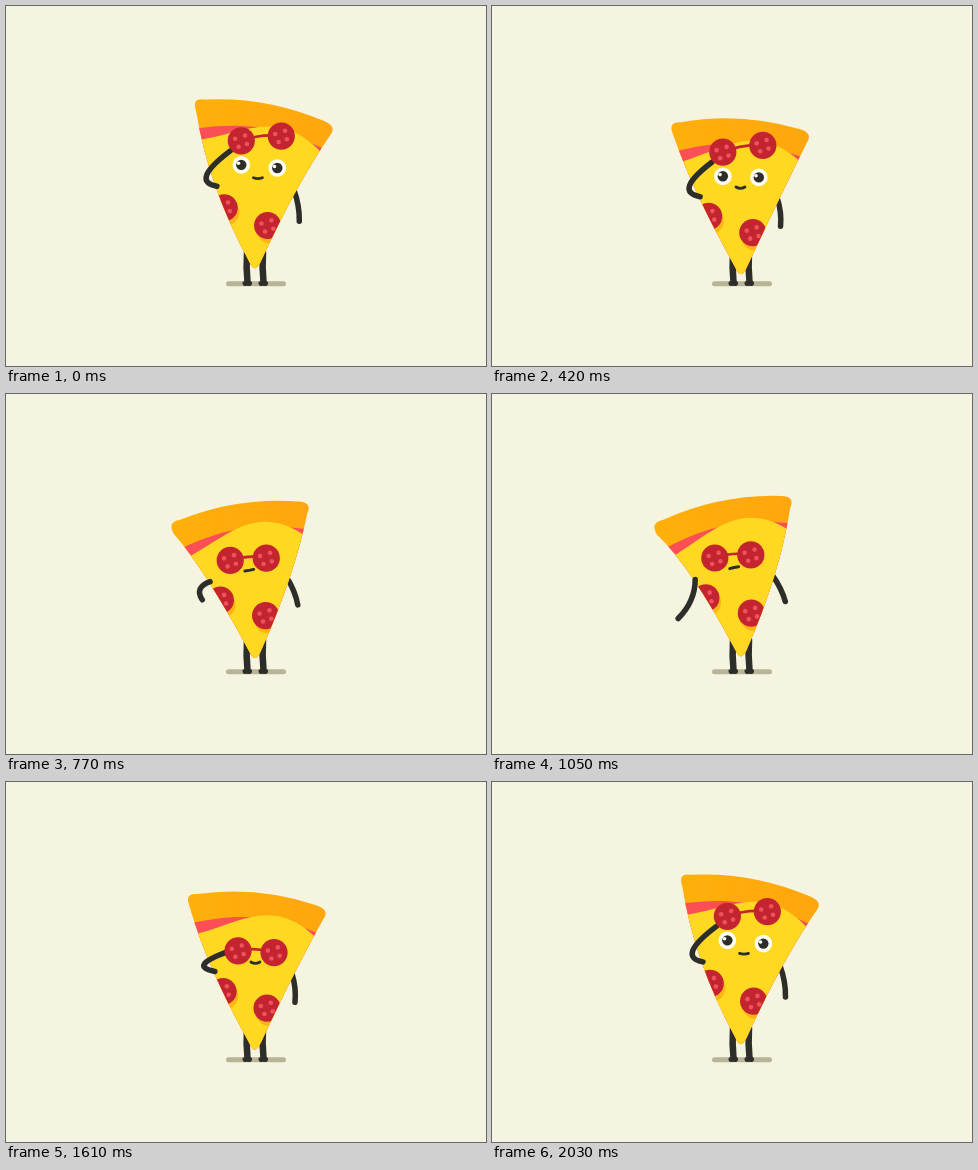
Recreate the animation shown at these times as an HTML page with a canvas. Size 480x360 px, loop 2100 ms.

```html
<!DOCTYPE html>
<html>
<head>
<meta charset="utf-8">
<title>Pizza slice with sunglasses</title>
<style>
html, body { margin: 0; width: 100%; height: 100%; overflow: hidden; background: #f5f4e0; }
canvas { display: block; }
</style>
</head>
<body>
<canvas id="stage" width="480" height="360"></canvas>
<script>
const ctx = document.getElementById('stage').getContext('2d');
const STEP = 70, COUNT = 30;
const PAPER = '#f5f4e0', INK = '#2d2e2a', CHEESE = '#ffd921', SHADE = '#fdb515', SAUCE = '#fb4f55';
const RED = '#c4242f', DOT = '#ee525b', WHITE = '#fffef6';
const TIP = [248.5, 262];

const shift = ([x, y], dx, dy) => [x + dx, y + dy];
const mix = (a, b, s) => a.map((v, k) => v + (b[k] - v) * s);
// Control point of a curve from a to b that passes through m
const through = (a, m, b) => m.map((v, k) => 2 * v - (a[k] + b[k]) / 2);

function ease(from, to, f) {
  const s = Math.min(1, Math.max(0, (f - from) / (to - from)));
  return s * s * (3 - 2 * s);
}

// One sway to the left and back per loop, with a squash at each crossing
function motion(f) {
  const angle = 2 * Math.PI * (f + 1) / COUNT;
  return { sway: Math.cos(angle), squash: Math.sin(angle) ** 2 };
}

// Moves a resting point of the slice; the bend grows with the height above the tip
function bender({ sway, squash }) {
  return (x, y) => {
    const h = TIP[1] - y, k = (h / 147) ** 2, side = (x - TIP[0]) * k;
    return [
      x + k * (13.5 * sway + 2.5 * squash),
      y + sway * (0.19 * side - 4 * k * k) + squash * (6 + 0.04 * h + 0.05 * side)
    ];
  };
}

function disc([x, y], r, color) {
  ctx.fillStyle = color;
  ctx.beginPath();
  ctx.arc(x, y, r, 0, 7);
  ctx.fill();
}

function line(a, c, b, width, color) {
  ctx.strokeStyle = color;
  ctx.lineWidth = width;
  ctx.beginPath();
  ctx.moveTo(...a);
  ctx.quadraticCurveTo(...c, ...b);
  ctx.stroke();
}

function salami(p) {
  disc(p, 13.6, RED);
  for (let i = 0; i < 4; i++) {
    const angle = 1.47 * i - 0.95;
    disc(shift(p, 6.5 * Math.cos(angle), 6.5 * Math.sin(angle)), 2.3, DOT);
  }
}

function eye(p) {
  disc(p, 8.8, WHITE);
  disc(p, 5.2, INK);
  disc(shift(p, -2.8, -1.6), 1.8, WHITE);
}

function slice(bend) {
  const a = bend(175, 113.5), b = bend(313, 111.5), t = bend(...TIP), m = mix(a, b, 0.5);
  const len = Math.hypot(t[0] - m[0], t[1] - m[1]);
  // u runs along the crust, v from the crust towards the tip
  const at = (u, v) => a.map((p, k) => p + u * (b[k] - p) + v * (t[k] - m[k]) / len);
  const tipL = shift(t, -5, -6), tipR = shift(t, 6, -6);
  const left = at(0.015, 9), right = at(0.985, 9);

  ctx.save();
  ctx.beginPath();
  ctx.moveTo(...tipL);
  ctx.quadraticCurveTo(...through(tipL, bend(205.5, 182.5), left), ...left);
  ctx.quadraticCurveTo(...at(-0.025, -4), ...at(0.07, -4));
  ctx.quadraticCurveTo(...at(0.5, -18), ...at(0.93, -4));
  ctx.quadraticCurveTo(...at(1.03, -1), ...right);
  ctx.quadraticCurveTo(...through(right, bend(286, 183.5), tipR), ...tipR);
  ctx.quadraticCurveTo(...shift(t, 0, 6), ...tipL);
  ctx.clip();

  const crust = ctx.createLinearGradient(...a, ...b);
  crust.addColorStop(0, '#ffb00a');
  crust.addColorStop(1, '#ffa60e');
  ctx.fillStyle = crust;
  ctx.fillRect(140, 70, 210, 210);

  const layer = (color, v0, c1, c2, v1) => {
    ctx.fillStyle = color;
    ctx.beginPath();
    ctx.moveTo(...at(0, v0));
    ctx.bezierCurveTo(...at(0.38, c1), ...at(0.62, c2), ...at(1, v1));
    ctx.lineTo(...at(1.1, 180));
    ctx.lineTo(...at(-0.1, 180));
    ctx.fill();
  };
  layer(SAUCE, 27, 10, 10, 26);
  layer(CHEESE, 39, 24, -16, 37);

  for (const p of [bend(216, 202.5), bend(260.5, 219)]) {
    disc(shift(p, 2, 4.5), 13.2, SHADE);
    salami(p);
  }
  ctx.restore();
}

function ground() {
  ctx.fillStyle = PAPER;
  ctx.fillRect(0, 0, 480, 360);
  line([222.5, 277.7], [250, 277.7], [277.5, 277.7], 5, '#b8b498');
  for (const x of [241, 257]) {
    line([x, 246], [x - 1, 262], [x + 0.5, 276], 6.5, INK);
    line([x - 2, 277.5], [x, 277], [x + 2.5, 277.5], 5, INK);
  }
}

function draw(f) {
  const pose = motion(f), { sway, squash } = pose, bend = bender(pose);
  ctx.lineCap = 'round';
  ground();

  const shoulderR = bend(284, 182);
  const handR = [293.5 - 5 * squash, 211 + 4 * sway + 9 * squash];
  line(shoulderR, shift(mix(shoulderR, handR, 0.5), 3, 0), handR, 5.5, INK);

  slice(bend);

  const eyes = [bend(229, 161), bend(265, 161)];
  eyes.forEach(eye);
  const mouth = bend(247, 172.5), smile = 0.3 + 0.7 * sway + 1.5 * squash, tilt = Math.min(0, sway);
  line(shift(mouth, -4.5, -smile / 2 - tilt), shift(mouth, 0, smile), shift(mouth, 4.5, -smile / 2 + tilt), 2.8, INK);

  const lift = 1 - ease(6, 9, f) + ease(23, 28, f);
  const lensL = shift(eyes[0], 0, -24 * lift), lensR = shift(eyes[1], 4 * lift, -32 * lift);

  // The hand lets go, hangs, then swings outwards on its way back; the elbow lags behind
  const fall = ease(8, 13, f), rise = ease(16, 23, f);
  const shoulderL = bend(207, 182.5);
  const grip = shift(lensL, -11, 1 + 9 * lift);
  const handL = shift(mix(shift(shoulderL, -17, 39), grip, 1 - fall + rise), -64 * rise * (1 - rise), 0);
  const fold = Math.sqrt(1 - fall) + rise * rise;
  const elbow = shift(shoulderL, -27 * fold, 22 - 27 * fold);
  line(shoulderL, elbow, handL, 5.5, INK);

  line(lensL, shift(mix(lensL, lensR, 0.5), 0, -5), lensR, 2.6, RED);
  salami(lensL);
  salami(lensR);
}

function tick() {
  draw(Math.floor(performance.now() / STEP) % COUNT);
  requestAnimationFrame(tick);
}
tick();
</script>
</body>
</html>
```
